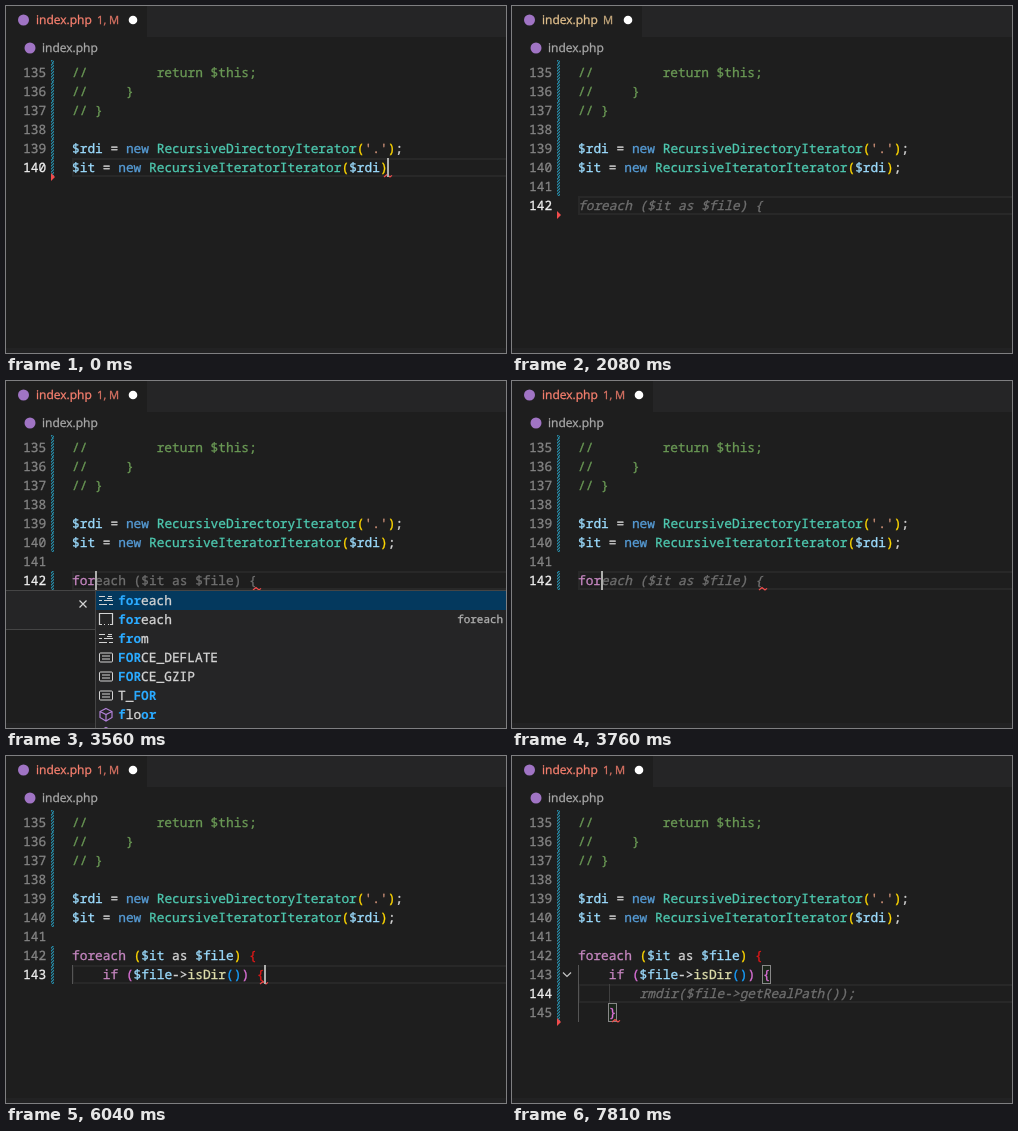
Recreate the animation shown at these times as an HTML page. Size 500x347 px, loop 8000 ms.

```html
<!DOCTYPE html>
<html lang="en">
<head>
<meta charset="utf-8">
<title>Code completion</title>
<style>
  html, body { margin: 0; width: 500px; height: 347px; overflow: hidden; background: #1e1e1e; }
  svg { display: block; }
  text, tspan { fill: currentColor; stroke: currentColor; stroke-width: .3px; }
  text { white-space: pre; text-rendering: geometricPrecision; }
  .code { font: 12.83px "Noto Sans Mono", "DejaVu Sans Mono", monospace; color: #d4d4d4; }
  .ui { font: 12px "Open Sans", "Noto Sans", sans-serif; }
  .ghost { color: #6f6f6f; }
  .italic { font-style: italic; }
  .match { font-weight: bold; stroke: none; }
</style>
</head>
<body>
<svg id="stage" width="500" height="347" viewBox="0 0 500 347"></svg>
<script>
const LOOP = 8000, LEFT = 66, CHAR = 7.697, ROW = 19, FIRST = 135, TOP = 57;
const BRACKETS = ['#ffd700', '#da70d6', '#179fff'];
const LOOP_HEAD = 'foreach ($it as $file) {';
const IF_HEAD = 'if ($file->isDir()) {';
const ITERATOR = '$it = new RecursiveIteratorIterator($rdi)';

const start = {
  rows: {
    135: '//         return $this;', 136: '//     }', 137: '// }', 138: '',
    139: "$rdi = new RecursiveDirectoryIterator('.');", 140: ITERATOR
  },
  cur: 140, col: 41, caret: true, ghost: '', italic: true, popup: false,
  error: [140, 378], red: true, hatch: [[134, 140]], mark: 140,
  paired: false, boxes: false, fold: false
};

// Each step patches the state from its time onwards.
const steps = [
  [50, { rows: { 140: ITERATOR + ';' }, col: 42, error: [140, 385] }],
  [250, { hatch: [[134, 137], [139, 140]], mark: 0 }],
  [490, { error: null }],
  [540, { red: false }],
  [580, { caret: false }],
  [1070, { rows: { 141: '' }, cur: 141, col: 0, caret: true }],
  [1250, { ghost: LOOP_HEAD }],
  [1300, { hatch: [[134, 140]], mark: 141 }],
  [1550, { rows: { 142: '' }, cur: 142, ghost: '', mark: 142 }],
  [1730, { ghost: LOOP_HEAD }],
  [1780, { hatch: [[134, 141]] }],
  [2080, { caret: false }],
  [2590, { caret: true }],
  [3030, { rows: { 142: 'f' }, col: 1, ghost: LOOP_HEAD.slice(1) }],
  [3130, { error: [142, 247] }],
  [3280, { rows: { 142: 'fo' }, col: 2, ghost: LOOP_HEAD.slice(2) }],
  [3360, { red: true, hatch: [[134, 140], [142, 142]], mark: 0 }],
  [3410, { rows: { 142: 'for' }, col: 3, ghost: LOOP_HEAD.slice(3) }],
  [3480, { popup: true, italic: false }],
  [3710, { popup: false, italic: true }],
  [4200, { rows: { 142: LOOP_HEAD }, col: 24, ghost: '' }],
  [4730, { caret: false }],
  [4880, { rows: { 143: '    ' }, cur: 143, col: 4, caret: true, error: null }],
  [5060, { ghost: IF_HEAD, error: [143, 254] }],
  [5110, { hatch: [[134, 142]], mark: 143 }],
  [5410, { caret: false }],
  [5800, { rows: { 143: '    ' + IF_HEAD }, col: 25, ghost: '', caret: true }],
  [6040, { hatch: [[134, 140], [142, 143]], mark: 0 }],
  [6230, { rows: { 144: '        ' }, cur: 144, col: 8, error: null }],
  [6380, { ghost: 'rmdir($file->getRealPath());', error: [144, 339] }],
  [6530, { rows: { 144: '    }' }, col: 5, ghost: '', error: [144, 100], paired: true }],
  [6580, { boxes: true }],
  [6780, { hatch: [[134, 144]], mark: 144 }],
  [7070, { col: 4, boxes: false }],
  [7170, { boxes: true }],
  [7320, { rows: { 144: '        ', 145: '    }' }, col: 8, error: [145, 100], mark: 145 }],
  [7420, { ghost: 'rmdir($file->getRealPath());' }],
  [7520, { hatch: [[134, 145]], fold: true }],
  [7810, { caret: false }]
];

const states = [[0, start]];
for (const [at, patch] of steps) {
  const prev = states[states.length - 1][1];
  states.push([at, { ...prev, ...patch, rows: { ...prev.rows, ...patch.rows } }]);
}

const rowY = n => TOP + (n - FIRST) * ROW;
const colX = c => LEFT + c * CHAR;
const escape = s => s.replace(/>/g, '&gt;');
const span = (s, color, cls = '') => `<tspan class="${cls}" color="${color}">${escape(s)}</tspan>`;
const rect = (x, y, w, h, fill, extra = '') =>
  `<rect x="${x}" y="${y}" width="${w}" height="${h}" fill="${fill}" ${extra}/>`;
const text = (x, y, cls, body, style = '') =>
  `<text x="${x}" y="${y}" class="${cls}" style="${style}">${body}</text>`;
const line = (d, stroke, width = 1) =>
  `<path d="${d}" fill="none" stroke="${stroke}" stroke-width="${width}"/>`;
const dot = (x, y, r, fill) => `<circle cx="${x}" cy="${y}" r="${r}" fill="${fill}"/>`;

const TOKENS = [
  [/^\/\/.*/, '#6a9955'], [/^\$\w+/, '#9cdcfe'], [/^'.*?'/, '#ce9178'],
  [/^new\b/, '#569cd6'], [/^Recursive\w+/, '#4ec9b0'],
  [/^(foreach|for|if)\b/, '#c586c0'], [/^isDir/, '#dcdcaa'], [/^(\w+|\s+|.)/, '#d4d4d4']
];

function highlight(src, row, paired) {
  let out = '', depth = row > 142 ? 1 : 0;
  while (src) {
    let [rule, color] = TOKENS.find(([re]) => re.test(src));
    const word = src.match(rule)[0];
    if (word === '(') color = BRACKETS[depth++];
    if (word === ')') color = BRACKETS[--depth];
    if (word === '}') color = BRACKETS[1];
    if (word === '{') color = row === 143 && paired ? BRACKETS[1] : '#e01818';
    out += span(word, color);
    src = src.slice(word.length);
  }
  return out;
}

function header(red) {
  const width = red ? 141 : 130, color = red ? '#f8806f' : '#e2c08d';
  return rect(0, 0, 500, 54, '#1e1e1e') + rect(width, 0, 500 - width, 31, '#252526') +
    dot(17.5, 14, 5.5, '#a074c4') +
    text(30, 18, 'ui', 'index.php', `color:${color}`) +
    text(91, 18, 'ui', red ? '1, M' : 'M', `color:${color};opacity:.85;font-size:11.2px`) +
    dot(width - 14, 14, 4.3, '#fff') +
    dot(24, 42, 5.5, '#a074c4') +
    text(36, 46, 'ui', 'index.php', 'color:#a9a9a9');
}

function gutter(s) {
  let out = '';
  for (const [from, to] of s.hatch) {
    // The stripes restart at the top of every row.
    for (let n = from; n <= to; n++) {
      out += `<g transform="translate(45 ${rowY(n)})">${rect(0, 0, 3, ROW, 'url(#hatch)')}</g>`;
    }
  }
  if (s.mark) out += `<path d="M45 ${rowY(s.mark + 1) - 4}l4 4-4 4z" fill="#f14c4c"/>`;
  if (s.fold) out += line(`M51 ${rowY(143) + 7.5}l4 4 4-4`, '#c5c5c5', 1.2);
  return out;
}

function guides(s) {
  const last = Math.max(...Object.keys(s.rows));
  let out = '';
  if (last > 142) out += rect(66, rowY(143), 1, (last - 142) * ROW, '#555');
  if (last > 144) out += rect(97, rowY(144), 1, ROW, '#404040');
  if (s.boxes) {
    const box = (n, c) => rect(Math.floor(colX(c)) + .5, rowY(n) + .5, 8, 18, '#1b251b', 'stroke="#888"');
    out += box(143, 24) + box(last, 4);
  }
  return out;
}

function code(s) {
  let out = '';
  for (const [key, src] of Object.entries(s.rows)) {
    const n = +key, y = rowY(n) + 14, active = n === s.cur;
    let body = highlight(src, n, s.paired);
    if (active && s.ghost) {
      body += `<tspan class="ghost${s.italic ? ' italic' : ''}">${escape(s.ghost)}</tspan>`;
    }
    out += text(17, y, 'code', n, `color:${active ? '#f0f0f0' : '#858585'}`);
    out += text(LEFT, y, 'code', body);
  }
  return out;
}

const items = [
  ['word', '[for]each'], ['snippet', '[for]each'], ['word', '[fro]m'],
  ['constant', '[FOR]CE_DEFLATE'], ['constant', '[FOR]CE_GZIP'],
  ['constant', 'T_[FOR]'], ['method', '[f]lo[or]'], ['method', '']
];

const icons = {
  word: y => line(`M93 ${y - 4}h6m3 0h4M93 ${y}h3m2 0h9M93 ${y + 4}h8m2 0h4M101 ${y - 2}h5`, '#d4d4d4', 1.2),
  snippet: y => line(`M96 ${y + 5}h-2.500v-11h13v11h-2.500M98 ${y + 5}h1m3 0h1`, '#d4d4d4', 1.2),
  constant: y => rect(93.5, y - 4.5, 13, 9, 'none', 'stroke="#d4d4d4" rx="1"') +
    line(`M96 ${y - 1.5}h8M96 ${y + 1.5}h8`, '#d4d4d4'),
  method: y => line(`M100 ${y - 6}l6 3v6l-6 3.500-6-3.500v-6zM94 ${y - 3}l6 3 6-3M100 ${y}v6.500`, '#b180d7', 1.2)
};

function popup() {
  const border = 'stroke="#454545"';
  let out = rect(-1, 209.5, 90.5, 39, '#252526', border) +
    line('M73.500 219.500l7 7m0-7l-7 7', '#d4d4d4', 1.2) +
    rect(89.5, 209.5, 420, 140, '#252526', border) +
    rect(90, 210, 410, ROW, '#04395e');
  items.forEach(([kind, label], i) => {
    const y = 219.5 + i * ROW;
    const body = label.split(/[[\]]/)
      .map((part, j) => j % 2 ? span(part, '#2aaaff', 'match') : span(part, '#d4d4d4')).join('');
    out += icons[kind](y) + text(112, y + 4.5, 'code', body);
  });
  return out + text(497, 242, 'code', 'foreach', 'text-anchor:end;font-size:10.9px;color:#b0b0b0');
}

const defs = `<defs>
  <pattern id="hatch" width="3" height="3" patternUnits="userSpaceOnUse">
    <path d="M1.500 0L0 1.500V3L3 0zM3 1.500L1.500 3H3z" fill="#2596b5"/>
  </pattern></defs>`;

function draw(s) {
  const y = rowY(s.cur);
  let out = defs + rect(0, 0, 500, 347, '#1e1e1e') + rect(0, 342, 500, 5, '#222223') +
    rect(67, y + 1, 440, ROW - 2, 'none', 'stroke="#282828" stroke-width="2"') +
    gutter(s) + header(s.red) + guides(s) + code(s);
  if (s.error) {
    const [n, x] = s.error;
    out += line(`M${x} ${rowY(n + 1)}l3-2.500 3 2.500 2-1.600`, '#f14c4c', 1.2);
  }
  if (s.caret) out += rect(Math.floor(colX(s.col)), y, 2, ROW, '#aeafad');
  if (s.popup) out += popup();
  return out;
}

const stage = document.getElementById('stage');
const origin = performance.now();
let shown = -1;

function tick() {
  const t = (performance.now() - origin) % LOOP;
  let i = states.length - 1;
  while (states[i][0] > t) i--;
  if (i !== shown) {
    stage.innerHTML = draw(states[i][1]);
    shown = i;
  }
  requestAnimationFrame(tick);
}
tick();
</script>
</body>
</html>
```
